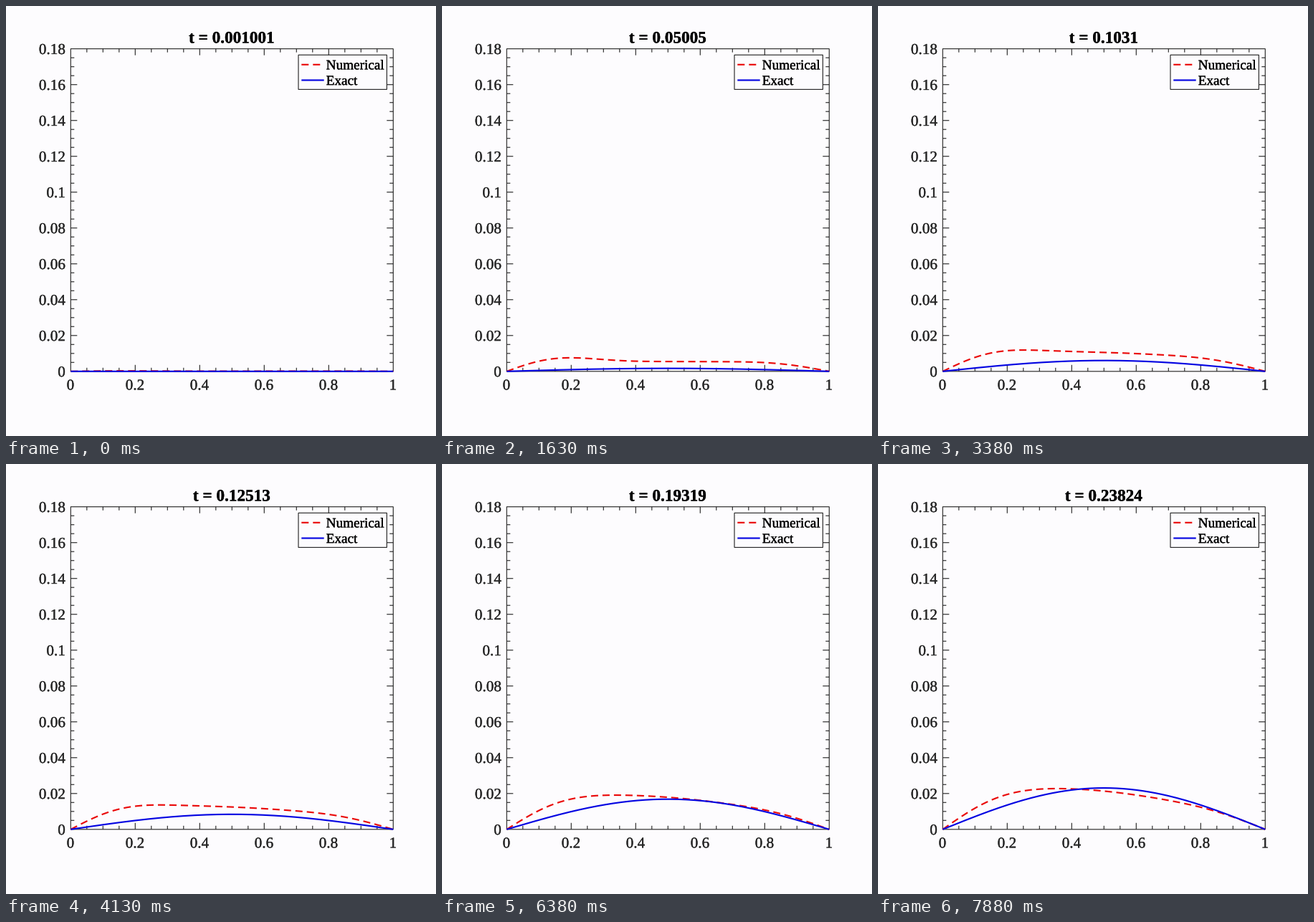
These frames come from a looping animation (600 px wide and 600 px high, 8000 ms). A matplotlib script:

```python
import numpy as np
import matplotlib.pyplot as plt
from matplotlib.animation import FuncAnimation
from matplotlib.patheffects import withStroke

FRAMES, INTERVAL = 64, 125
LEFT, RIGHT, TOP, BOTTOM = 90.3, 540.3, 59.7, 509.8
Y_MAX = 0.18
PT = 0.72  # points per pixel at 100 dpi
INK, BG, RED, BLUE = "#262626", "#fdfcfe", "#ea0a0a", "#0505e2"
THIN, THICK = 1.15 * PT, 2.15 * PT
DASH = (0, (10 / 2.15, 6 / 2.15))

plt.rcParams["font.family"] = "Liberation Serif"
plt.rcParams["text.hinting"] = "none"
fig = plt.figure(figsize=(6, 6), dpi=100, facecolor=BG)
ax = fig.add_axes([0, 0, 1, 1])
ax.set(xlim=(0, 600), ylim=(600, 0))
ax.axis("off")


def px(x):
    return LEFT + (RIGHT - LEFT) * x


def py(y):
    return BOTTOM - (BOTTOM - TOP) * y / Y_MAX


def rule(xs, ys):
    ax.plot(xs, ys, color=INK, lw=THIN, snap=False,
            solid_capstyle="butt", zorder=2)


def box(x0, y0, x1, y1):
    ax.add_patch(plt.Rectangle((x0, y0), x1 - x0, y1 - y0, fill=False,
                               ec=INK, lw=THIN, snap=False, zorder=2))


def label(x, y, s, size, ha="center", color=INK, **kw):
    # A hairline stroke gives the slightly heavy look of smoothed text
    return ax.text(x, y, s, fontsize=size * PT, ha=ha, va="baseline", color=color,
                   path_effects=[withStroke(linewidth=0.3 * PT, foreground=color)],
                   **kw)


def curve(xs, ys, color, ls="-", z=3):
    return ax.plot(xs, ys, color=color, lw=THICK, ls=ls, zorder=z, snap=False,
                   solid_capstyle="butt", dash_capstyle="butt")[0]


def draw_axes():
    box(LEFT, TOP, RIGHT, BOTTOM)
    for i in range(1, 20):
        x, n = px(i / 20), 9 if i % 4 == 0 else 5
        rule([x, x], [BOTTOM, BOTTOM - n])
        rule([x, x], [TOP, TOP + n])
    for i in range(1, 36):
        y, n = py(i * 0.005), 9 if i % 4 == 0 else 5
        rule([LEFT, LEFT + n], [y, y])
        rule([RIGHT, RIGHT - n], [y, y])
    for i in range(6):
        label(px(i / 5) - 0.4, 535.4, f"{i / 5:g}", 21.2)
    for i in range(10):
        label(82.8, py(i * 0.02) + 7.3, f"{i * 0.02:g}", 21.2, ha="right")


def draw_legend():
    box(408, 68.3, 531.4, 116.4)
    for y, name, color, ls in ((81.8, "Numerical", RED, DASH),
                               (103.5, "Exact", BLUE, "-")):
        curve([412.3, 443.7], [y, y], color, ls)
        label(446.7, y + 6.6, name, 19.2, ha="left", color="black")


def exact(x, t):
    k = np.pi ** 2
    return 1.555 * (t / k - (1 - np.exp(-k * t)) / k ** 2) * np.sin(np.pi * x)


# Sine modes: saturating amplitude, rate, linear drift (in 1e-4)
MODES = ((53, 20, 760), (5.5, 35, 125), (23, 52, 0),
         (7.1, 65, -14), (5.3, 65, -10), (1, 70, -4))


def numerical(x, t):
    return 1e-4 * sum((a * (1 - np.exp(-k * t)) + c * t) * np.sin(n * np.pi * x)
                      for n, (a, k, c) in enumerate(MODES, 1))


draw_axes()
draw_legend()
x = np.linspace(0, 1, 201)
num_line = curve(px(x), py(0 * x), RED, DASH, 4)
exact_line = curve(px(x), py(0 * x), BLUE, "-", 5)
title = label(315, 51.4, "", 23.2, color="black", weight="bold")


def update(i):
    t = round(1 + 3.763 * i) / 999
    num_line.set_ydata(py(numerical(x, t)))
    exact_line.set_ydata(py(exact(x, t)))
    title.set_text(f"t = {t:.5g}")
    return num_line, exact_line, title


anim = FuncAnimation(fig, update, frames=FRAMES, interval=INTERVAL,
                     repeat=True, repeat_delay=0)
plt.show()
```
